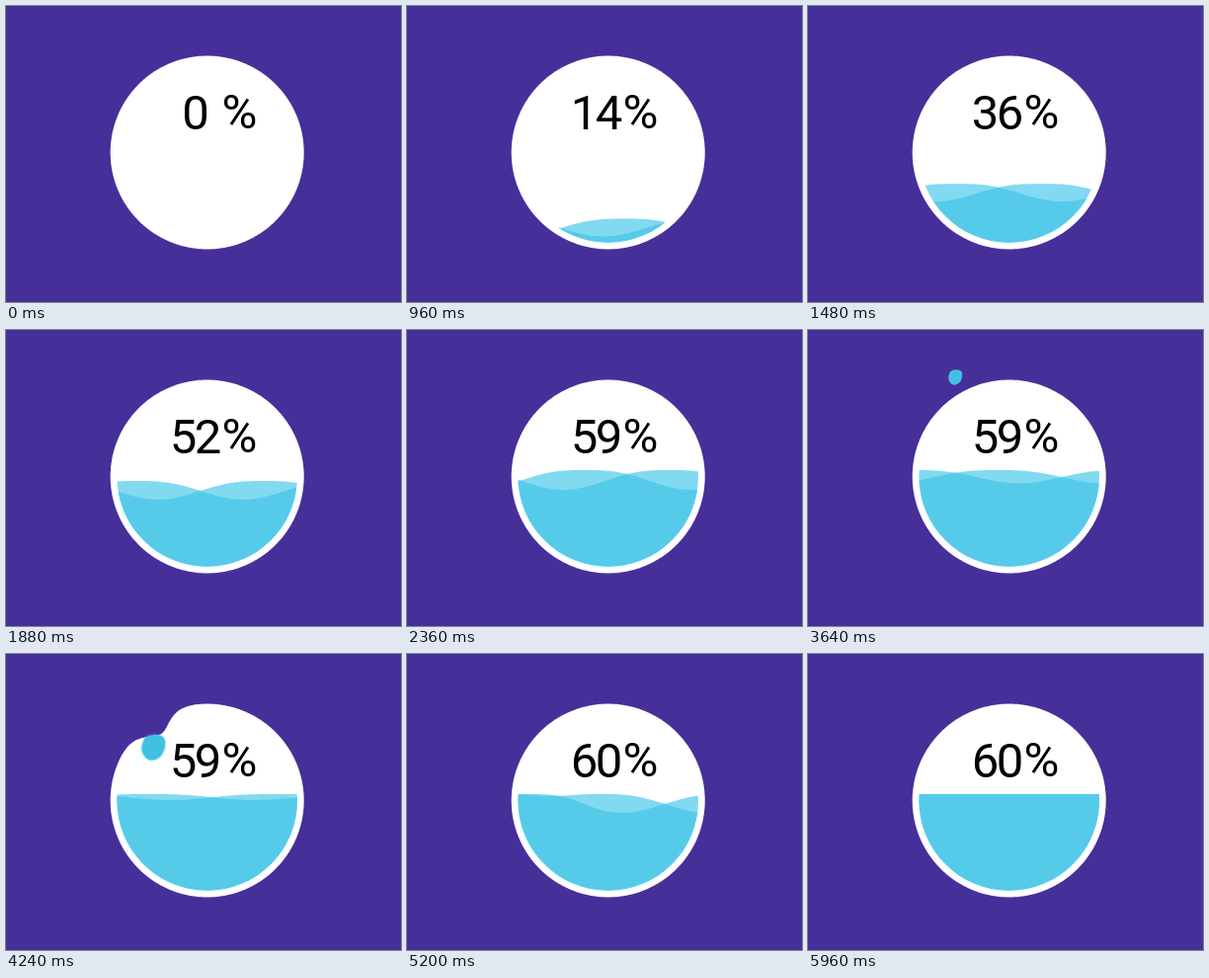
Recreate the animation shown at these times as an HTML page with a canvas. Size 400 px wide and 300 px high, loop 6000 ms.

```html
<!DOCTYPE html>
<html lang="en">
<head>
<meta charset="utf-8">
<title>Filling gauge</title>
<style>
  html, body { margin: 0; width: 100%; height: 100%; overflow: hidden; background: #472f99; }
  canvas { display: block; }
</style>
</head>
<body>
<canvas id="stage" width="400" height="300"></canvas>
<script>
const ctx = document.getElementById('stage').getContext('2d');
const LOOP = 6000, STEP = 40, CX = 203.7, CY = 148.5, OUTER = 98, INNER = 91.3;
const FILL_START = 600, FILL_END = 2042, HIT = 4800;

// [time, value] pairs joined by straight lines
const WAVE_DEPTH = [[0, 18], [1480, 18], [2360, 20], [3120, 19], [3760, 12], [4240, 6], [4440, 3],
                    [4700, 3], [5040, 17], [5300, 20], [5720, 7], [5920, 0], [6000, 0]];
const DROP_SHAPE = [[-11, -4], [-7, -12], [9, -13], [13, -5], [10, 7], [3, 13], [-6, 13], [-12, 4]];

const clamp = v => Math.max(0, Math.min(1, v));
const smooth = (a, b, v) => { const u = clamp((v - a) / (b - a)); return u * u * (3 - 2 * u); };

function track(keys, t) {
  const i = Math.max(1, keys.findIndex(k => k[0] >= t));
  const [t0, v0] = keys[i - 1], [t1, v1] = keys[i];
  return v0 + (v1 - v0) * clamp((t - t0) / (t1 - t0));
}

// White disc, pressed in at the upper left where the drop lands
function disc(t) {
  const dent = 16 * smooth(3760, 4200, t) * (1 - smooth(4300, 4720, t));
  ctx.beginPath();
  for (let a = 0; a < 360; a++) {
    const r = OUTER - dent * Math.exp(-(((a - 55.5) / 8.7) ** 2) / 2);
    const rad = a * Math.PI / 180;
    ctx.lineTo(CX - r * Math.cos(rad), CY - r * Math.sin(rad));
  }
  ctx.closePath();
  ctx.fillStyle = '#fff';
  ctx.fill();
}

function drop(t) {
  if (t < 2960 || t > 5000) return;
  const size = 0.6 + 0.4 * smooth(3800, 4240, t);
  const bottom = 7 + 0.0853 * (t - 3080);
  const pts = DROP_SHAPE.map(([x, y]) => [149 + x * size, bottom - 11.5 * size + y * size]);
  const mid = (p, q) => [(p[0] + q[0]) / 2, (p[1] + q[1]) / 2];
  ctx.beginPath();
  ctx.moveTo(...mid(pts[pts.length - 1], pts[0]));
  pts.forEach((p, i) => ctx.quadraticCurveTo(...p, ...mid(p, pts[(i + 1) % pts.length])));
  ctx.closePath();
  ctx.fillStyle = '#40c0e3';
  ctx.fill();
  ctx.strokeStyle = 'rgba(86, 203, 233, .35)';
  ctx.lineWidth = 2.5 * smooth(3800, 4200, t);
  if (ctx.lineWidth && t > 3800) ctx.stroke();
}

function water(t, level) {
  if (level <= 0) return;
  const crest = 240 - 98 * level / 59;
  const depth = track(WAVE_DEPTH, t);
  const center = 193 + 0.2784 * (t - 1480);
  // The second swell spreads in from the right
  const swell = x => t < HIT ? 1 : smooth(110, 200, x + Math.max(0, t - 5200) * 0.4);
  const wave = (x, shift) => {
    const s = (1 - Math.cos((x - center - shift) * 2 * Math.PI / 215)) / 2;
    return crest + depth * swell(x) * s ** 1.5;
  };
  const layer = (pick, color) => {
    ctx.beginPath();
    ctx.moveTo(100, 250);
    for (let x = 100; x <= 306; x += 2) ctx.lineTo(x, pick(wave(x, -43), wave(x, 43)));
    ctx.lineTo(306, 250);
    ctx.fillStyle = color;
    ctx.fill();
  };
  ctx.save();
  ctx.beginPath();
  ctx.arc(CX, CY, INNER, 0, 2 * Math.PI);
  ctx.clip();
  layer(Math.min, '#82daf0');
  layer(Math.max, '#56cbe9');
  ctx.restore();
}

function label(n) {
  ctx.fillStyle = '#000';
  ctx.font = '49px Roboto, "Liberation Sans", sans-serif';
  ctx.textAlign = 'center';
  const digits = String(n);
  const places = digits.length > 1 ? [179.5, 204.5] : [192];
  places.forEach((x, i) => ctx.fillText(digits[i], x, 124.5));
  ctx.fillText('%', 236.5, 124);
}

function draw(now) {
  const t = Math.floor(now % LOOP / STEP) * STEP;
  const level = 59 * clamp((t - FILL_START) / (FILL_END - FILL_START));
  ctx.fillStyle = '#472f99';
  ctx.fillRect(0, 0, 400, 300);
  disc(t);
  drop(t);
  water(t, level);
  label(t >= HIT ? 60 : Math.floor(level));
}

const start = performance.now();
function frame() {
  draw(performance.now() - start);
  requestAnimationFrame(frame);
}
frame();
</script>
</body>
</html>
```
